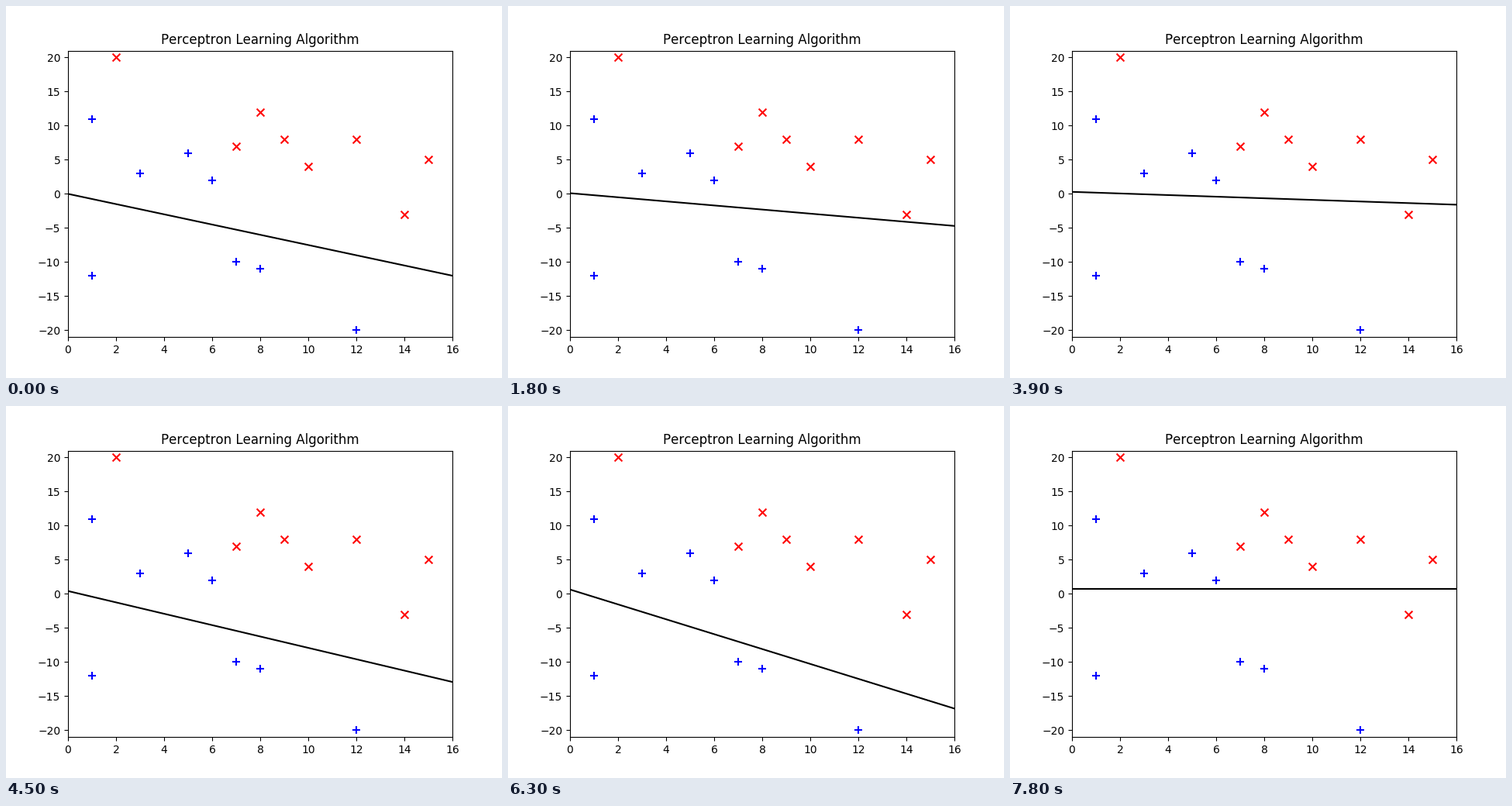
Recreate the animation shown at these times as a matplotlib script. Size 640 px wide and 480 px high, loop 8 s.

```python
import numpy as np
import matplotlib.pyplot as plt
from matplotlib.animation import FuncAnimation

TICK_MS = 100
TICKS_PER_UPDATE = 3
TOTAL_TICKS = 80

# Two classes of (x, y) samples, in the order the learner checks them.
ABOVE = np.array([(14, -3), (2, 20), (7, 7), (8, 12),
                  (9, 8), (10, 4), (12, 8), (15, 5)])
BELOW = np.array([(8, -11), (6, 2), (7, -10), (12, -20),
                  (1, 11), (1, -12), (3, 3), (5, 6)])


def with_bias(points):
    return np.column_stack([np.ones(len(points)), points])


# Negating one class makes "correct" mean a positive score everywhere.
signed = np.vstack([with_bias(ABOVE), -with_bias(BELOW)])


def learn(updates):
    """Perceptron rule: add the first sample that is misclassified."""
    weights = np.array([0.0, 6.0, 8.0])
    for _ in range(updates):
        wrong = signed[signed @ weights <= 0]
        if len(wrong):
            weights += wrong[0]
    return weights


plt.rcParams["font.family"] = "DejaVu Sans"
plt.rcParams["text.kerning_factor"] = 6  # whole-pixel letter spacing
fig, ax = plt.subplots(figsize=(6.4, 4.8), dpi=100)
ax.set_title("Perceptron Learning Algorithm")
ax.set_xlim(0, 16)
ax.set_ylim(-21, 21)

for points, marker, color in ((ABOVE, "x", "red"), (BELOW, "+", "blue")):
    ax.scatter(*points.T, s=50, marker=marker, color=color, linewidths=1.5)

line_x = np.array([0, 16])
boundary, = ax.plot(line_x, line_x, color="black", linewidth=1.5)


def update(tick):
    bias, wx, wy = learn(tick // TICKS_PER_UPDATE)
    boundary.set_ydata(-(bias + wx * line_x) / wy)
    return boundary,


anim = FuncAnimation(fig, update, frames=TOTAL_TICKS, interval=TICK_MS,
                     repeat=True, repeat_delay=0)
plt.show()
```
